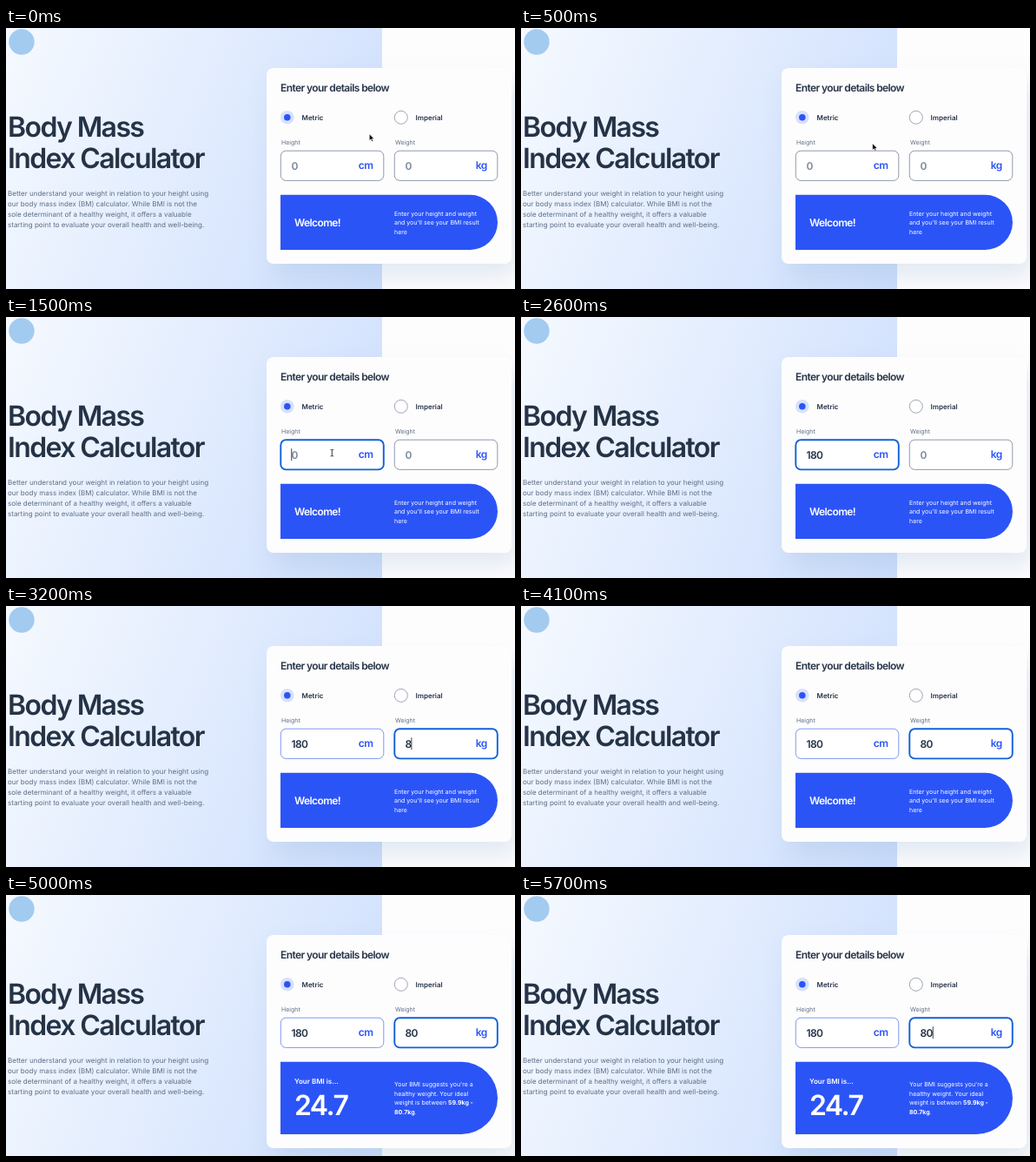
Write an HTML page that moves like this. It is 586 px wide and 300 px high and loops after 5800 ms.

```html
<!DOCTYPE html>
<html lang="en">
<head>
<meta charset="utf-8">
<title>Body Mass Index Calculator</title>
<style>
  :root { --blue: #2b54f7; --ink: #253347; --slate: #5e6e85; --ring: #0f62d8; }
  html, body { margin: 0; width: 100%; height: 100%; overflow: hidden; background: #fefdfe; }
  .stage { position: relative; width: 586px; height: 300px; overflow: hidden; }
  .backdrop {
    position: absolute; left: -56px; top: -35px; width: 489px; height: 368px;
    background: linear-gradient(292deg, #cbddfd, #fbfdff);
  }
  .card {
    position: absolute; left: 300px; top: 45.5px; width: 282px; height: 225.5px;
    border-radius: 8px; background: #fefdfe;
    box-shadow: 8px 16px 28px rgba(143, 174, 207, .25);
  }
  svg { position: absolute; left: 0; top: 0; }
  text {
    font-family: Inter, "Liberation Sans", sans-serif; font-optical-sizing: none;
    text-rendering: geometricPrecision; fill: var(--slate);
  }
  .xl { font-size: 32px; font-weight: 600; letter-spacing: -1.6px; }
  .m { font-size: 12px; font-weight: 600; letter-spacing: -.6px; }
  .body { font-size: 8px; }
  .strong { font-size: 8px; font-weight: 600; }
  .small { font-size: 7px; }
  .dark { fill: var(--ink); }
  .unit { fill: var(--blue); }
  .panel text { fill: #fff; }
  .panel .b { font-weight: 700; }
  .box { fill: #fff; stroke: #748297; stroke-width: .8; }
  .hover .box { stroke: #5f80f0; }
  .focus .box { stroke: var(--ring); stroke-width: 1.9; }
  .value { fill: var(--ink); }
  .empty .value { fill: #7c8898; }
  .caret { fill: #111; }
</style>
</head>
<body>
<div class="stage">
  <div class="backdrop"></div>
  <div class="card" id="card"></div>
  <svg width="586" height="300" viewBox="0 0 586 300">
    <circle cx="18" cy="16" r="14.7" fill="#a3cbf0"/>
    <text class="xl dark" x="2" y="125.3">Body Mass</text>
    <text class="xl dark" x="2" y="160.5">Index Calculator</text>
    <g class="body" id="intro"></g>

    <text class="m dark" x="316" y="73">Enter your details below</text>
    <circle cx="323.8" cy="102.8" r="7.8" fill="#d7e1fa"/>
    <circle cx="323.8" cy="102.8" r="3.8" fill="#2b54f7"/>
    <circle cx="454.8" cy="102.8" r="7.5" fill="#fff" stroke="#748297" stroke-width=".7"/>
    <text class="strong dark" x="340.5" y="105.8">Metric</text>
    <text class="strong dark" x="471.5" y="105.8">Imperial</text>
    <g id="fields"></g>

    <g class="panel">
      <path id="shape" fill="#2b54f7"/>
      <g id="welcome">
        <text class="m" x="332" y="227.9">Welcome!</text>
        <g class="small" id="hint"></g>
      </g>
      <g id="result">
        <text class="strong" x="332" y="216.6">Your BMI is...</text>
        <text class="xl" x="332" y="253.2">24.7</text>
        <g class="small" id="advice"></g>
      </g>
    </g>

    <g id="pointer">
      <path id="arrow" d="M0 0V7.6L1.8 6L3 8.7L4.3 8.1L3.1 5.5H5.4Z"
        fill="#000" stroke="#fff" stroke-width=".6"/>
      <path id="beam" d="M-1.7 -3.8Q0 -3.8 0 -3V3Q0 3.8 -1.7 3.8M1.7 -3.8Q0 -3.8 0 -3M0 3Q0 3.8 1.7 3.8"
        fill="none" stroke="#222" stroke-width=".9"/>
    </g>
  </svg>
</div>
<script>
  const LOOP = 5800, STEP = 100, BLINK = 500;
  const MOVE = { from: [418.3, 121.8], to: [375.3, 156.2], start: 200, end: 1000 };
  const RESULT_AT = 4200, HIDE_POINTER_AT = 1800;

  // Each key: [time, text in the field afterwards]
  const FIELDS = [
    { x: 316, label: "Height", unit: "cm", unitX: 405.8, focus: 1400, blur: 2800,
      keys: [[1800, "1"], [1900, "18"], [2100, "180"]] },
    { x: 447, label: "Weight", unit: "kg", unitX: 540.8, focus: 2800, blur: LOOP,
      keys: [[3200, "8"], [3400, "80"]] }
  ];

  const $ = id => document.getElementById(id);
  const show = (el, on) => { el.style.display = on ? "" : "none"; };

  function addLines(id, x, y, step, lines) {
    $(id).innerHTML = lines
      .map((line, i) => `<text x="${x}" y="${y + i * step}">${line}</text>`).join("");
  }

  addLines("intro", 2, 192.6, 12, [
    "Better understand your weight in relation to your height using",
    "our body mass index (BM) calculator. While BMI is not the",
    "sole determinant of a healthy weight, it offers a valuable",
    "starting point to evaluate your overall health and well-being."
  ]);
  addLines("hint", 447, 215.6, 10.5, [
    "Enter your height and weight", "and you'll see your BMI result", "here"
  ]);
  addLines("advice", 447, 220.3, 10.5, [
    "Your BMI suggests you're a", "healthy weight. Your ideal",
    'weight is between <tspan class="b">59.9kg -</tspan>',
    '<tspan class="b">80.7kg</tspan>.'
  ]);

  $("fields").innerHTML = FIELDS.map(f => `<g>
    <text class="small" x="${f.x + 1}" y="134.4">${f.label}</text>
    <rect class="box" x="${f.x + .3}" y="141.2" width="118.5" height="34.2" rx="6"/>
    <text class="m value" x="${f.x + 12.5}" y="162.6"></text>
    <text class="m unit" x="${f.unitX}" y="162.4">${f.unit}</text>
    <rect class="caret" y="151.2" width=".8" height="14"/>
  </g>`).join("");
  FIELDS.forEach((f, i) => {
    f.el = $("fields").children[i];
    f.value = f.el.querySelector(".value");
    f.caret = f.el.querySelector(".caret");
  });

  function drawField(f, t, hover) {
    const last = f.keys.filter(([at]) => at <= t).pop();
    const focused = t >= f.focus && t < f.blur;
    f.el.classList.toggle("focus", focused);
    f.el.classList.toggle("hover", hover);
    f.el.classList.toggle("empty", !last);
    f.value.textContent = last ? last[1] : "0";
    const since = t - (last ? last[0] : f.focus);
    show(f.caret, focused && since % (2 * BLINK) < BLINK);
    const width = last ? f.value.getComputedTextLength() : 0;
    f.caret.setAttribute("x", f.x + 12.4 + width);
  }

  function drawPanel(done) {
    const bottom = done ? 275 : 255, r = (bottom - 191.8) / 2;
    $("shape").setAttribute("d",
      `M316 191.8H${566 - r}a${r} ${r} 0 0 1 0 ${2 * r}H316Z`);
    $("card").style.height = (done ? 245.5 : 225.5) + "px";
    show($("welcome"), !done);
    show($("result"), done);
  }

  function draw(t) {
    const p = Math.min(1, Math.max(0, (t - MOVE.start) / (MOVE.end - MOVE.start)));
    const ease = p * p * (3 - 2 * p);
    const [x, y] = MOVE.from.map((a, i) => a + (MOVE.to[i] - a) * ease);
    const inside = y > 141;
    $("pointer").setAttribute("transform", `translate(${x} ${y})`);
    show($("pointer"), t < HIDE_POINTER_AT);
    show($("arrow"), !inside);
    show($("beam"), inside);
    FIELDS.forEach((f, i) => drawField(f, t, inside && i === 0));
    drawPanel(t >= RESULT_AT);
  }

  const start = performance.now();
  function tick() {
    const t = (performance.now() - start) % LOOP;
    draw(Math.floor(t / STEP) * STEP);
    requestAnimationFrame(tick);
  }
  tick();
</script>
</body>
</html>
```
